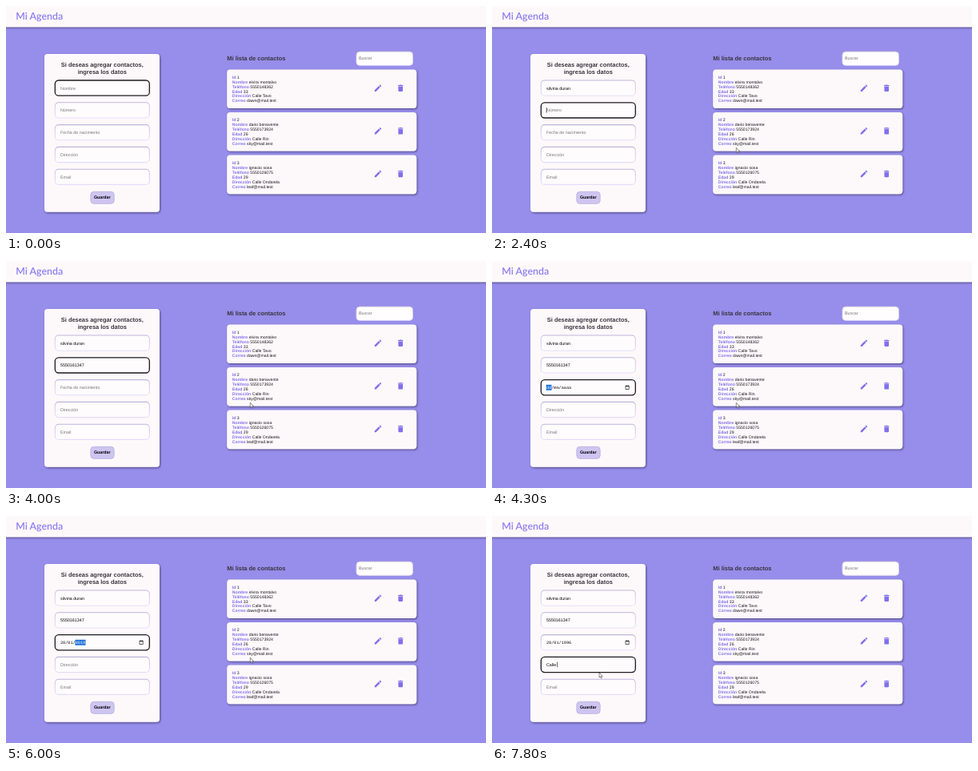
An HTML page for the animation above (8000 ms loop, 600 by 284 pixels).

```html
<!DOCTYPE html>
<html lang="es">
<head>
<meta charset="utf-8">
<title>Mi Agenda</title>
<style>
  html, body { margin: 0; width: 100%; height: 100%; overflow: hidden; background: #978dea; }
  svg { display: block; width: 600px; height: 284px; }
  text { font: 5.33px Arial, "Liberation Sans", sans-serif; white-space: pre; text-rendering: geometricPrecision; }
  .brand { font: 600 12.4px "Trebuchet MS", Lato, sans-serif; fill: #8e7cef; }
  .head { font-size: 7.45px; font-weight: bold; fill: #38353d; }
  .mid { text-anchor: middle; }
  .hint { fill: #77747a; }
  .row { font-size: 5.15px; fill: #17151c; }
  .row tspan { font-weight: bold; fill: #8270ec; }
  .date { font: 5.2px "Liberation Mono", "DejaVu Sans Mono", monospace; }
  .save { font-weight: bold; }
  .panel { fill: #fdf9fb; filter: url(#drop); }
  .icon { fill: #8270ec; }
</style>
</head>
<body>
<svg id="stage" viewBox="0 0 600 284">
  <defs>
    <filter id="drop" x="-10%" y="-20%" width="120%" height="150%">
      <feDropShadow dx="1" dy="1.2" stdDeviation="0.8" flood-color="#2c2550" flood-opacity=".65"/>
    </filter>
    <linearGradient id="inset" x1="0" y1="0" x2="0" y2="1">
      <stop offset="0" stop-color="#bdb5d9"/>
      <stop offset=".25" stop-color="#d3cbec"/>
      <stop offset="1" stop-color="#e4def7"/>
    </linearGradient>
    <path id="pen" d="M3 17.25V21h3.75L17.81 9.94l-3.75-3.75L3 17.25zM20.71 7.04c.39-.39.39-1.02 0-1.41l-2.34-2.34c-.39-.39-1.02-.39-1.41 0l-1.83 1.83 3.75 3.75 1.83-1.83z"/>
    <path id="bin" d="M6 19c0 1.1.9 2 2 2h8c1.1 0 2-.9 2-2V7H6v12zM19 4h-3.5l-1-1h-5l-1 1H5v2h14V4z"/>
  </defs>
  <rect width="600" height="284" fill="#978dea"/>
  <rect class="panel" x="-5" y="-5" width="610" height="31.3"/>
  <text class="brand" x="12.3" y="17.2">Mi Agenda</text>

  <rect class="panel" x="48" y="60" width="144" height="197.8" rx="4"/>
  <text class="head mid" x="120.3" y="76">Si deseas agregar contactos,</text>
  <text class="head mid" x="120.3" y="84.6">ingresa los datos</text>
  <g id="form"></g>
  <rect x="105.8" y="232.3" width="29.4" height="15" rx="4" fill="#cec5f1" stroke="#b9afe0" stroke-width=".8"/>
  <text class="save mid" x="120.3" y="241.3">Guardar</text>

  <text class="head" x="276.3" y="68">Mi lista de contactos</text>
  <rect x="438" y="57" width="70.5" height="17.3" rx="4" fill="#fffdfd" stroke="url(#inset)" stroke-width=".9"/>
  <text class="hint" x="441" y="67.4">Buscar</text>
  <g id="list"></g>

  <g id="date">
    <rect id="mark" y="154.8" height="6.9" fill="#1b6fd8"/>
    <g id="parts"></g>
    <path d="M167 156.4h4.2v4.1h-4.2zM168 155.4v1M170.2 155.4v1" fill="none" stroke="#222" stroke-width=".7"/>
    <path d="M166.8 156.1h4.6v1h-4.6z" fill="#222"/>
  </g>
  <rect id="caret" width=".65" height="6.6" fill="#111"/>
  <path id="arrow" d="M0 0V6L1.4 4.8L2.4 7L3.4 6.6L2.4 4.4H4.2Z" fill="#fff" stroke="#333" stroke-width=".55"/>
  <path id="beam" d="M-1.3 -3H1.3M0 -3V3M-1.3 3H1.3" fill="none" stroke="#555" stroke-width=".7"/>
</svg>
<script>
const LOOP = 8000, LEFT = 68, CHAR = 3.12;
const $ = id => document.getElementById(id);
const rowY = i => 102.6 + i * 27.8;

const hints = ["Nombre", "Número", "Fecha de nacimiento", "Dirección", "Email"];
const people = [
  ["1", "elvira montalvo", "5550148362", "33", "Calle Tavo", "dawn@mail.test"],
  ["2", "dario benavente", "5550173924", "26", "Calle Rin", "sky@mail.test"],
  ["3", "ignacio sosa", "5550126075", "29", "Calle Ondarela", "leaf@mail.test"]
];
const labels = ["Id", "Nombre", "Teléfono", "Edad", "Dirección", "Correo"];

// Each table holds [time, value]; the last passed entry counts.
const focusAt = [[0, 0], [2300, 1], [4200, 2], [7000, 3]];
const caretAt = [[0, 0], [400, 1], [900, 0], [1100, 1], [2600, 0], [2800, 1], [4000, 0], [7000, 1]];
const typing = {
  0: ["silvina duran", [[0, 0], [1100, 1], [1200, 2], [1300, 3], [1500, 4], [1600, 6], [1700, 7], [1800, 9], [1900, 10], [2000, 12], [2100, 13]]],
  1: ["5550161347", [[0, 0], [2800, 1], [2900, 2], [3000, 3], [3100, 4], [3200, 5], [3400, 6], [3500, 7], [3600, 8], [3700, 9], [3800, 10]]],
  3: ["Calle ", [[0, 0], [7300, 1], [7500, 2], [7600, 4], [7800, 6]]]
};
const dateAt = [[0, ""], [4200, "dd/mm/aaaa"], [4600, "02/mm/aaaa"], [4800, "28/mm/aaaa"],
  [5200, "28/00/aaaa"], [5400, "28/01/aaaa"], [5800, "28/01/0001"], [6000, "28/01/0019"],
  [6200, "28/01/0199"], [6400, "28/01/1996"]];
const markAt = [[0, 0], [4800, 3], [5400, 6]];

const at = (table, t) => table.reduce((v, [time, next]) => t >= time ? next : v, table[0][1]);
const set = (el, attrs) => { for (const k in attrs) el.setAttribute(k, attrs[k]); };
const show = (el, on) => set(el, { visibility: on ? "visible" : "hidden" });

$("form").innerHTML = hints.map((h, i) =>
  `<rect x="61.3" y="${rowY(i) - 9.6}" width="118" height="19.2" rx="4.5" fill="#fffcfd"/>
   <text x="${LEFT}" y="${rowY(i) + 2}"></text>`).join("");

$("list").innerHTML = people.map((p, i) => {
  const y = 79.4 + i * 53.6;
  const rows = p.map((v, k) =>
    `<text class="row" x="282.8" y="${y + 11.3 + k * 5.94}"><tspan>${labels[k]}</tspan> ${v}</text>`).join("");
  const icon = (id, x) =>
    `<use class="icon" href="#${id}" transform="translate(${x - 5.64} ${y + 17.7}) scale(.47)"/>`;
  return `<rect class="panel" x="276.2" y="${y}" width="237" height="48.6" rx="4"/>` +
    rows + icon("pen", 465) + icon("bin", 493.2);
}).join("");

$("parts").innerHTML = [0, 2, 3, 5, 6].map(n =>
  `<text class="date" x="${LEFT + n * CHAR}" y="160.2"></text>`).join("");

const boxes = [...$("form").querySelectorAll("rect")];
const texts = [...$("form").querySelectorAll("text")];
const parts = [...$("parts").children];

const pen = document.createElement("canvas").getContext("2d");
pen.font = '53.3px Arial, "Liberation Sans", sans-serif';
const widthOf = s => pen.measureText(s).width / 10;

const ease = p => { p = Math.min(1, Math.max(0, p)); return p * p * (3 - 2 * p); };
const mix = (a, b, p) => a + (b - a) * p;

function pointer(t) {
  if (t < 3000) {
    const p = ease((t - 100) / 600);
    return [mix(136, 305.3, p), mix(106, 177.3, p)];
  }
  const p = ease((t - 6200) / 600);
  return [mix(305.3, 134, p), mix(177.3, 196, p)];
}

function draw(t) {
  const focus = at(focusAt, t);
  const date = at(dateAt, t);
  let typed = "";

  hints.forEach((hint, i) => {
    const entry = typing[i];
    const value = entry ? entry[0].slice(0, at(entry[1], t)) : "";
    if (i === focus) typed = value;
    const on = i === focus;
    set(boxes[i], { stroke: on ? "#1c1a20" : "url(#inset)", "stroke-width": on ? 1.3 : 1.1 });
    texts[i].textContent = i === 2 && date ? "" : value || hint;
    set(texts[i], { class: value ? "" : "hint" });
  });

  const mark = at(markAt, t), marked = focus === 2;
  $("date").style.display = date ? "" : "none";
  show($("mark"), marked);
  set($("mark"), { x: LEFT + mark * CHAR - .3, width: (mark === 6 ? 4 : 2) * CHAR + .6 });
  [[0, 2], [2, 3], [3, 5], [5, 6], [6, 10]].forEach(([a, b], i) => {
    parts[i].textContent = date.slice(a, b);
    set(parts[i], { fill: marked && a === mark ? "#fff" : "#111" });
  });

  show($("caret"), at(caretAt, t) && focus !== 2);
  set($("caret"), { x: LEFT + widthOf(typed) - .2, y: rowY(focus) - 3.4 });

  const [x, y] = pointer(t);
  const inField = x > 61 && x < 180 && hints.some((h, i) => Math.abs(y - rowY(i)) < 10);
  show($("arrow"), t >= 100 && !inField);
  show($("beam"), t >= 100 && inField);
  set($(inField ? "beam" : "arrow"), { transform: `translate(${x} ${y})` });
}

const start = performance.now();
function tick(now) {
  draw(Math.max(0, now - start) % LOOP);
  requestAnimationFrame(tick);
}
draw(0);
requestAnimationFrame(tick);
</script>
</body>
</html>
```
